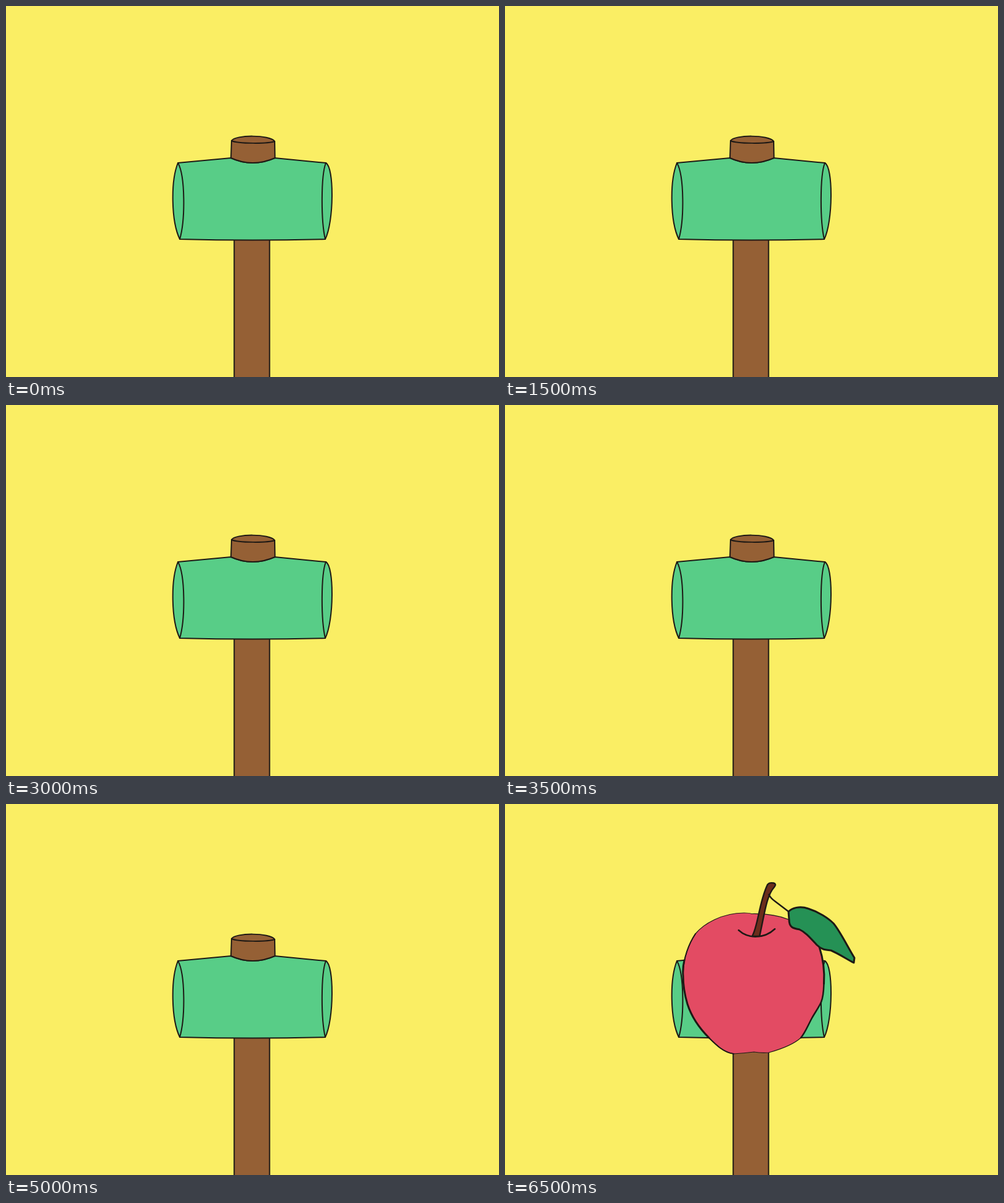
An HTML page for the animation above (7500 ms loop, 800 by 603 pixels).

```html
<!DOCTYPE html>
<html lang="en">
<head>
<meta charset="utf-8">
<title>Mallet</title>
<style>
  html, body { margin: 0; width: 100%; height: 100%; overflow: hidden; background: #faee64; }
  svg { display: block; width: 100%; height: 100%; }
  path { stroke: #1e1915; stroke-width: 2; stroke-linejoin: round; stroke-linecap: round; fill: none; }
  .wood { fill: #956035; }
  .head { fill: #58cd87; }
  .rubber { fill: #2fa6e1; stroke-width: 1.6; }
  .shine { fill: #fff; stroke-width: 1; }
  .skin { fill: #e34b63; stroke-width: 1.2; }
  .stem { fill: #6b2d1c; stroke-width: 2.4; }
  .leaf { fill: #259155; stroke-width: 3; }
  .mid { stroke-width: 2.5; }
  .bold { stroke-width: 3; }
  .prop { opacity: 0; animation: 7.5s step-end infinite; }
  #balloon { animation-name: balloon; }
  #apple { animation-name: apple; }
  @keyframes balloon {
    0% { opacity: 0; }
    26.6667% { opacity: 1; }
    40%, 100% { opacity: 0; }
  }
  @keyframes apple {
    0% { opacity: 0; }
    86.6667%, 100% { opacity: 1; }
  }
</style>
</head>
<body>
<svg viewBox="0 0 800 603" preserveAspectRatio="none">
  <g id="mallet">
    <path class="wood" d="M370.3 375V610H427.7V375Z"/>
    <path class="head" d="M279 255L365 247Q400 263 436 247L519 255C533 262 532 352 518 379Q400 382 282 379C268 350 267 285 279 255Z"/>
    <path d="M279 255C291 276 291 348 282 379M519 255C511 276 511 348 518 379"/>
    <path class="wood" d="M366 219L365 247Q400 263 436.5 247L436 220C428 209 372 209 366 219Z"/>
    <path d="M366 219C376 224 426 224 436 220"/>
  </g>

  <g id="balloon" class="prop">
    <path class="rubber" d="M398 398L393 404.5Q400 410 405 408.5Q408 406 404 401L400 398Z"/>
    <path class="rubber" d="M341 110C358 95 378 90 400 90C424 90 447 96 459 107C485 124 511 160 511 205C511 243 505 273 494 296C477 328 448 368 434 379C426 383 418 392 408 391.5L403 390Q402 396 399 397L395 391C383 388 376 385 371 380C346 356 325 322 308 297C297 281 290 250 290 215C290 180 312 139 341 110Z"/>
    <path class="shine" d="M335 159C338 156 343 156 343 161C341 177 335 205 327 224C325 228 319 229 317 224C312 205 311 178 335 159Z"/>
    <path class="bold" d="M337.5 157.5Q342 155.5 342.3 161"/>
    <path d="M318 225.5Q321 228.5 325 226"/>
    <path class="shine" d="M484 203C491 200 500 217 499.500 232C499 241 495 250 490 253C485 255 479 252 479 247C478 232 481 215 484 203Z"/>
    <path d="M480.5 250Q484 254.5 489 253"/>
  </g>

  <g id="apple" class="prop">
    <path class="skin" d="M309 211C322 195 352 177 388 177Q397 177 400 178.5C424 178 444 181 461 188C482 195 500 211 510 232C517 254 519 272 517.5 292C517 307 516 315 513 322C509 331 503 339 498 348C491 361 487 372 480 380C468 391 446 399 428 404Q416 405 404 403Q388 405 371 406C355 404 343 392 331 380C316 365 303 347 296 325C291 308 289 294 289 275C289 250 299 226 309 211Z"/>
    <path d="M309 211C299 226 289 250 289 275"/>
    <path class="bold" d="M291 254Q288 266 289 279C289 294 291 308 296 325C303 347 316 365 331 380"/>
    <path d="M331 380C343 392 355 404 371 406"/>
    <path class="bold" d="M510 232C517 254 519 272 517.5 292"/>
    <path class="mid" d="M517.5 292C517 307 516 315 513 322C509 331 503 339 498 348C491 361 487 372 480 380"/>
    <path class="mid" d="M379 205C394 219 420 220 438 203"/>
    <path class="stem" d="M401 215C411 198 412 160 426 131Q429 127 436 128.5Q441 130 437 135C424 149 421 180 413 215Z"/>
    <path class="mid" d="M428 147Q431 153 438 158L459 174"/>
    <path class="leaf" d="M460 175C466 169 478 165 492 170C508 175 524 185 533 194C544 207 557 234 567 250L566 258C556 253 541 243 529 238C518 237 513 236 506 229C494 216 487 208 478 204C468 202 461 201 461 188Z"/>
  </g>
</svg>
</body>
</html>
```
